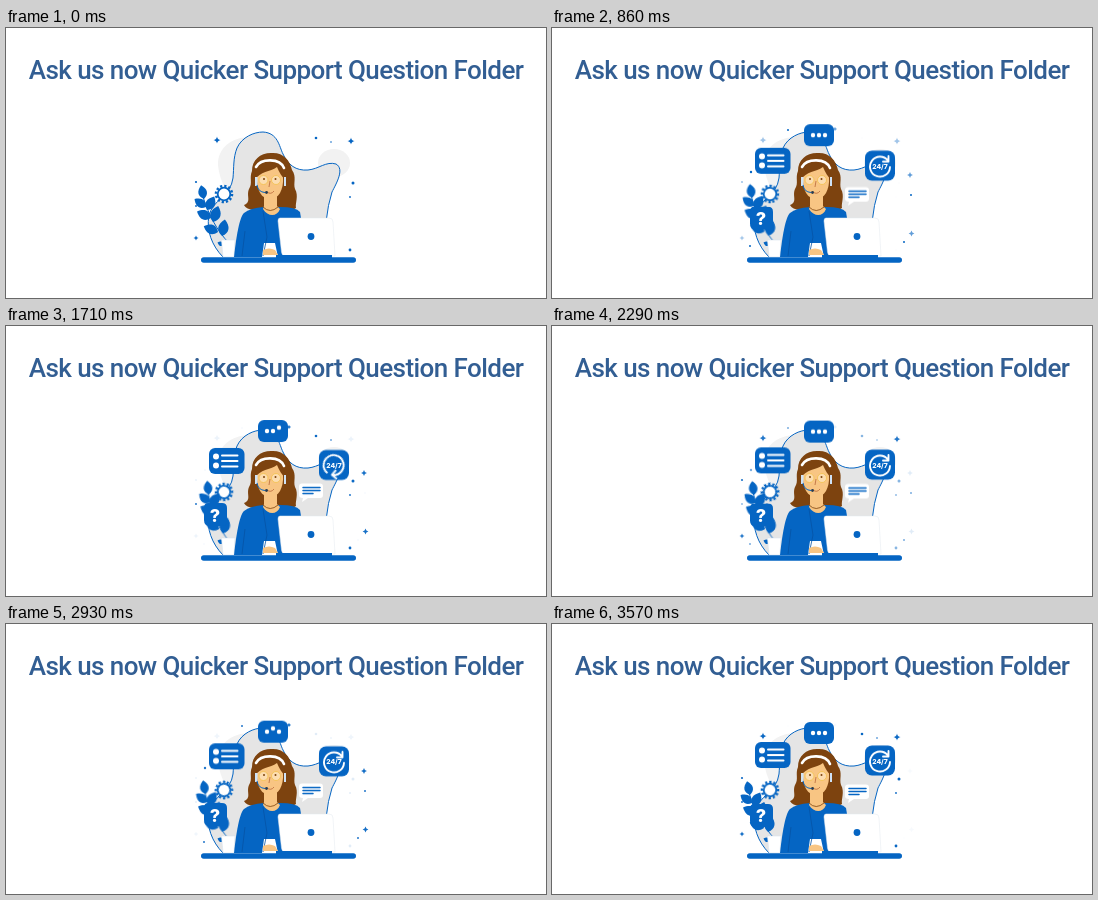
An HTML page that plays this animation: 540 px wide and 270 px high, repeating every 3.64 s.

```html
<!DOCTYPE html>
<html lang="en">
<head>
<meta charset="utf-8">
<title>Support desk</title>
<style>
  html, body { margin: 0; width: 100%; height: 100%; overflow: hidden; background: #fff; }
  svg { display: block; width: 540px; height: 270px; }
  :root { --loop: 3640ms; --blue: #0565c3; --swing: cubic-bezier(.37, 0, .63, 1); }
  .title { font: 500 26px Roboto, sans-serif; letter-spacing: -.58px; fill: #325e93; text-anchor: middle; }
  .blue { fill: var(--blue); }
  .line { fill: none; stroke: var(--blue); stroke-width: 1; }
  .white { fill: #fff; }
  .hair { fill: #7d430f; }
  .skin { fill: #f8c583; }
  .pale { fill: #f2f2f2; }
  .stroke { fill: none; stroke: #fff; stroke-linecap: round; stroke-linejoin: round; }
  .bold { font: 800 8px Inter, sans-serif; fill: #fff; text-anchor: middle; }

  /* one slow swing per loop */
  .drift { animation: drift var(--loop) var(--swing) infinite; }
  @keyframes drift { 50% { transform: translateY(var(--dy)); } }
  .sway { transform-origin: 222px 215px; animation: sway var(--loop) var(--swing) infinite; }
  @keyframes sway { 50% { transform: rotate(6deg); } }

  .pop { animation: var(--pop) var(--loop) linear infinite; }
  @keyframes quick { 0%, 1.9% { transform: scale(0); } 16%, 100% { transform: scale(1); } }
  @keyframes mid { 0%, 1.9% { transform: scale(0); } 18.5%, 100% { transform: scale(1); } }
  @keyframes late { 0%, 4% { transform: scale(0); } 22.5%, 100% { transform: scale(1); } }

  .gear { transform-origin: 218px 166px; animation: spin var(--loop) linear infinite; }
  @keyframes spin { to { transform: rotate(360deg); } }
  .clock { transform-origin: 328px 137px; animation: turn var(--loop) ease-in-out infinite; }
  @keyframes turn { 0%, 33% { transform: none; } 47% { transform: rotate(130deg); } 63%, 100% { transform: rotate(360deg); } }

  /* a wave runs over the three dots twice per loop */
  .dot { animation: hop var(--loop) ease-in-out var(--d, 0ms) infinite; }
  @keyframes hop {
    0%, 29%, 37%, 69%, 77%, 100% { transform: none; }
    33%, 73% { transform: translateY(-3.5px); }
  }

  .twinkle { animation: twinkle var(--t) var(--swing) var(--d, 0ms) infinite; }
  @keyframes twinkle { 0%, 100% { opacity: 1; } 50% { opacity: 0; } }
</style>
</head>
<body>
<svg viewBox="0 0 540 270">
  <defs>
    <path id="star" d="M0-3.6Q.5-.5 3.6 0Q.5.5 0 3.6Q-.5.5-3.6 0Q-.5-.5 0-3.6Z"/>
    <path id="leaf" d="M0 0C-6-4-5.5-9 0-14C5.500-9 6-4 0 0Z"/>
    <path id="wave" d="M217 229C206 218 200 202 203 188C206 172 225 168 227 150C228 140 227 130 231 120C236 109 248 104 257 104C272 105 273 118 277 126C282 137 290 143 302 142C313 141 320 133 330 136C339 141 330 156 326 164Q322 176 320 194"/>
  </defs>

  <text class="title" x="270" y="51">Ask us now Quicker Support Question Folder</text>

  <path class="pale" d="M212 137C211 119 228 108 246 109V168H224C217 158 213 148 212 137Z"/>
  <ellipse class="pale" cx="328" cy="135" rx="16" ry="14"/>
  <use href="#wave" fill="#e5e5e5"/>
  <use href="#wave" class="line"/>

  <g class="blue">
    <g class="twinkle" style="--t:1213ms">
      <use href="#star" x="211" y="112"/>
      <use href="#star" x="345" y="113"/>
      <use href="#star" transform="translate(190 210) scale(.7)"/>
      <circle cx="190" cy="154" r="1.1"/>
    </g>
    <g class="twinkle" style="--t:1213ms;--d:-607ms">
      <use href="#star" transform="translate(358 147) scale(.8)"/>
      <use href="#star" transform="translate(359.500 205.500) scale(.8)"/>
      <use href="#star" transform="translate(283 101) scale(.6)"/>
    </g>
    <g class="twinkle" style="--t:1820ms">
      <circle cx="310" cy="110" r="1.3"/><circle cx="325" cy="114" r=".8"/>
      <circle cx="347" cy="155" r="1.5"/><circle cx="344" cy="169" r=".9"/>
      <circle cx="344" cy="222" r="1.4"/><circle cx="190" cy="178" r=".9"/>
    </g>
    <g class="twinkle" style="--t:1820ms;--d:-910ms">
      <circle cx="236" cy="102" r="1"/><circle cx="199" cy="144" r="1.2"/>
      <circle cx="359" cy="167" r="1"/><circle cx="352" cy="214" r="1"/>
      <circle cx="198" cy="218" r="1"/>
    </g>
  </g>

  <g class="gear">
    <circle cx="218" cy="166" r="8" fill="none" stroke="#0565c3" stroke-width="2.6" stroke-dasharray="2.2 1.99"/>
    <circle cx="218" cy="166" r="6.3" fill="#fff" stroke="#0565c3" stroke-width="1.8"/>
  </g>

  <g class="sway blue">
    <path class="line" d="M223 215C211 203 203 187 197 169"/>
    <use href="#leaf" transform="translate(198 171) rotate(-12)"/>
    <use href="#leaf" transform="translate(200 179) rotate(-55)"/>
    <use href="#leaf" transform="translate(201 182) rotate(28) scale(1.1)"/>
    <use href="#leaf" transform="translate(205 190) rotate(-65) scale(1.1)"/>
    <use href="#leaf" transform="translate(207 194) rotate(18) scale(1.2)"/>
    <use href="#leaf" transform="translate(212 204) rotate(-68) scale(1.1)"/>
    <use href="#leaf" transform="translate(216 208) rotate(10) scale(1.2)"/>
  </g>
  <use href="#leaf" class="blue" transform="translate(218 217) rotate(-68) scale(.5)"/>
  <path fill="#fff" stroke="#d9e3ef" stroke-width=".6" d="M215.500 212H229L228 229H217Z"/>

  <path class="hair" d="M265 125C277 124 284 132 286 142C291 149 287 155 289 161C293 168 289 175 290 180C280 186 275 181 270 181H254C246 183 240 181 238 177C246 174 240 168 243 161C247 155 243 150 246 143C246 132 254 125 265 125Z"/>
  <path class="blue" d="M228 229C230 211 233 190 238 185Q244 180 258 179H274Q290 179 294 184L295 190V229Z"/>
  <path class="white" d="M258 215H269L272 229H256Z"/>
  <path class="skin" d="M258 167H271V178L274 181C271 189 262 189 257 181L258 178Z"/>
  <path fill="none" stroke="#7d430f" stroke-width=".8" d="M257 179Q264 186 272 179"/>
  <path class="skin" d="M251 147C252 139 257 136 264 136S276 139 277 148C278 163 272 171 264 171S250 163 251 147Z"/>
  <path class="hair" d="M249 152C248 139 255 132 264 132S279 139 280 153C276 149 273 144 271 139C264 144 254 143 249 152Z"/>
  <path class="stroke" stroke-width="2.600" d="M250 139C255 130 274 130 278 140"/>
  <g fill="#fff6df" fill-opacity=".5" stroke="#f3c04c" stroke-width=".8">
    <circle cx="257.500" cy="152" r="4.500"/><circle cx="270" cy="152" r="4.500"/>
  </g>
  <circle class="hair" cx="258" cy="151" r="1"/><circle class="hair" cx="269.500" cy="151" r="1"/>
  <path fill="none" stroke="#b8683a" stroke-width=".8" d="M264 153L263 159M261 164Q265 167 268 163"/>
  <path fill="#cfe3f7" d="M249 149h2.500v9h-2.500zM278 149h2v9h-2z"/>
  <path class="line" d="M251 157Q252 164 259 164.500"/>
  <circle cx="260.500" cy="164.500" r="1.400" fill="#263b50"/>
  <path fill="none" stroke="#0753a5" stroke-width=".8" d="M257 183L261 209L257 228M239 203L236 228"/>
  <path class="skin" d="M257 222Q263 219 269 222L272 227H257Z"/>

  <path fill="#fff" stroke="#e3e8ef" stroke-width=".5" d="M274 190H323Q327 190 327 194L329 228H279Q276 228 275.500 224L272 193Q272 190 274 190Z"/>
  <circle class="blue" cx="305" cy="208.500" r="3.400"/>
  <path class="blue" d="M270 227H326V230H270Z"/>
  <rect class="blue" x="195" y="229.300" width="155" height="5.500" rx="2.750"/>

  <g class="drift" style="--dy:4px">
    <g class="pop" style="--pop:mid;transform-origin:238px 144px">
      <rect class="blue" x="203" y="118" width="35.500" height="26" rx="6"/>
      <circle class="white" cx="210" cy="126.500" r="3"/><circle class="white" cx="210" cy="135.500" r="3"/>
      <path class="stroke" stroke-width="2" d="M216 125.500H231.500M216 131H231.500M216 136.500H231.500"/>
    </g>
  </g>

  <g class="drift" style="--dy:-4px">
    <g class="pop" style="--pop:mid;transform-origin:267px 120px">
      <rect class="blue" x="252" y="98" width="30" height="22" rx="6"/>
      <circle class="white dot" cx="261" cy="109" r="2.200"/>
      <circle class="white dot" cx="267" cy="109" r="2.200" style="--d:250ms"/>
      <circle class="white dot" cx="273" cy="109" r="2.200" style="--d:500ms"/>
    </g>
  </g>

  <g class="drift" style="--dy:-3px">
    <g class="pop" style="--pop:late;transform-origin:221px 180px">
      <path class="blue" d="M202 180H216Q221 180 221 185V198Q221 203 216 203H204Q198 203 198 197V185Q198 180 202 180Z"/>
      <text class="bold" x="209" y="198.500" style="font-size:18px">?</text>
    </g>
  </g>

  <g class="drift" style="--dy:2.500px">
    <g class="pop" style="--pop:quick;transform-origin:328px 151px">
      <rect class="blue" x="313" y="121.500" width="30" height="30" rx="7"/>
      <path class="stroke clock" stroke-width="1.900" d="M336 131.500A10 10 0 1 0 338 138M336.500 127V132.500H331"/>
      <text class="bold" x="328" y="139.500" style="font-size:6.800px">24/7</text>
    </g>
  </g>

  <g class="drift" style="--dy:-3px">
    <g class="pop" style="--pop:quick;transform-origin:295px 178px">
      <path class="white" d="M296 160.500H314Q317 160.500 317 163.500V172Q317 175 314 175H302L296 179L297 175Q293 175 293 172V163.500Q293 160.500 296 160.500Z"/>
      <path class="line" stroke-linecap="round" style="stroke-width:1.500" d="M297 164.500H314M297 167.500H314M297 170.500H307"/>
    </g>
  </g>
</svg>
</body>
</html>
```
